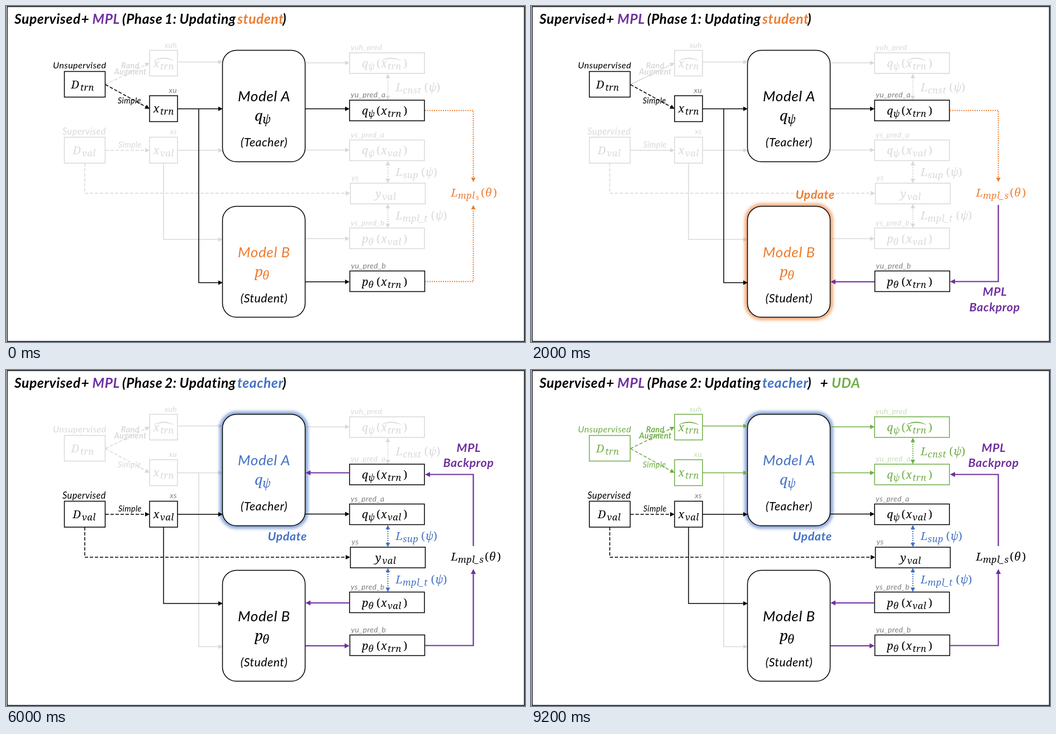
An HTML page that plays this animation: 929x603 px, repeating every 10 s.

```html
<!DOCTYPE html>
<html lang="en">
<head>
<meta charset="utf-8">
<title>Teacher and student training phases</title>
<style>
  html, body { margin: 0; width: 100%; height: 100%; overflow: hidden; background: #fff; }
  svg { display: block; width: 929px; height: 603px; }
  text { font-family: Lato, sans-serif; font-style: italic; letter-spacing: .025em; white-space: pre; }
  .math { font-family: "Noto Serif", "Liberation Serif", serif; }
  .up { font-style: normal; }
  .bold { font-weight: 700; }
</style>
</head>
<body>
<svg id="stage" viewBox="0 0 929 603" xmlns="http://www.w3.org/2000/svg"></svg>
<script>
const STEP_MS = 2000, STEPS = 5;
const INK = {
  k: '#000', g: '#d9d9d9', d: '#7f7f7f', o: '#ed7d31',
  b: '#4472c4', n: '#70ad47', l: '#c5e0b4', p: '#7030a0'
};

// One ink letter per step; '-' hides the part.
const UNSUP = 'kkggn', SUP = 'ggkkk', AUG = 'ggggn';
const UNSUP_TAG = 'ddggl', SUP_TAG = 'ggddd', AUG_TAG = 'ggggl';

const parts = [];
const add = (inks, draw) => parts.push({ inks, draw });

function textSvg(x, y, size, str, ink, { cls = '', anchor = 'start' } = {}) {
  return `<text x="${x}" y="${y}" font-size="${size}" fill="${ink}" class="${cls}" text-anchor="${anchor}">${str}</text>`;
}
const label = (inks, x, y, size, str, opt) =>
  add(inks, ink => textSvg(x, y, size, str, ink, opt));
const tag = (inks, x, y, str, anchor) => label(inks, x, y, 13.9, str, { anchor });

function box(inks, x, y, w, h) {
  add(inks, ink => `<rect x="${x}" y="${y}" width="${w}" height="${h}" fill="none" stroke="${ink}" stroke-width="1.5"/>`);
}

// Runs are [x, text, kind]: 's' subscript, 't' nested subscript, 'r' upright.
function math(inks, y, runs, size = 20) {
  add(inks, ink => runs.map(([x, str, kind]) => {
    const scale = kind === 's' ? .82 : kind === 't' ? .62 : 1;
    const drop = kind === 's' ? .2 : kind === 't' ? .32 : 0;
    return textSvg(x, y + size * drop, size * scale, str, ink, { cls: kind === 'r' ? 'math up' : 'math' });
  }).join(''));
}
const call = (inks, y, fn, sub, arg) => math(inks, y, [
  [637, fn], [648.5, sub, 's'], [663, '(', 'r'],
  [671, 'x'], [683, arg, 's'], [711.5, ')', 'r']
]);
const loss = (inks, y, x, sub, open, arg, extra = []) => math(inks, y, [
  [x, 'L'], [x + 12.5, sub, 's'], ...extra,
  [open, '(', 'r'], [open + 8, arg], [open + 22, ')', 'r']
]);
const hat = (inks, x, y) => add(inks, ink =>
  `<path d="M${x} ${y}q17.5-10 35 0q-17.5-7-35 0z" fill="${ink}" stroke="${ink}" stroke-width=".3"/>`);

// Polyline with a solid head at its end, and at its start when both is set.
function arrowSvg(points, ink, { width = 1.5, dash = '', both = false } = {}) {
  const len = width > 2 ? 9 : 8, half = width > 2 ? 4.5 : 4;
  const pts = points.map(p => [...p]);
  let heads = '';
  const head = (tip, from) => {
    const [tx, ty] = tip;
    const d = Math.hypot(tx - from[0], ty - from[1]);
    const ux = (tx - from[0]) / d, uy = (ty - from[1]) / d;
    const bx = tx - ux * len, by = ty - uy * len;
    heads += `<path d="M${tx} ${ty}L${bx - uy * half} ${by + ux * half}L${bx + uy * half} ${by - ux * half}z" fill="${ink}"/>`;
    tip[0] = bx + ux;
    tip[1] = by + uy;
  };
  head(pts[pts.length - 1], pts[pts.length - 2]);
  if (both) head(pts[0], pts[1]);
  return `<polyline points="${pts.join(' ')}" fill="none" stroke="${ink}" stroke-width="${width}" stroke-dasharray="${dash}"/>${heads}`;
}
const arrow = (inks, points, opt) => add(inks, (ink, step) =>
  arrowSvg(points, ink, typeof opt === 'function' ? opt(step) : opt));
const flat = (inks, x1, x2, y, opt) => arrow(inks, [[x1, y], [x2, y]], opt);

const DASH = { dash: '6 3' }, DOTS = { width: 2, dash: '2 2' };
const THICK = { width: 2.2 }, PAIR = { width: 2, dash: '2 2', both: true };
const dashUnlessUpdate = step => step === 1 ? {} : DASH;

// Models
function model(y, h, glowInks, nameInks, name, fn, sub, role) {
  const rect = `x="387.5" y="${y}" width="148" height="${h}" rx="25"`;
  add(glowInks, ink => `<rect ${rect} fill="none" stroke="${ink}" stroke-width="11" opacity=".6" filter="url(#soft)"/>`);
  add('kkkkk', ink => `<rect ${rect} fill="#fff" stroke="${ink}" stroke-width="1.5"/>`);
  label(nameInks, 462, y + 91.5, 26, name, { anchor: 'middle' });
  math(nameInks, y + 126.5, [[445, fn], [459, sub, 's']], 26);
  label('kkkkk', 462, y + 172, 21.2, role, { anchor: 'middle' });
}
model(79.5, 200, '---bb', 'kkbbb', 'Model A', 'q', 'ψ', '(Teacher)');
model(359.5, 199, '-o---', 'ookkk', 'Model B', 'p', 'θ', '(Student)');

// Title
const title = (inks, x, str) => label(inks, x, 32, 24.5, str, { cls: 'bold' });
title('kkkkk', 15, 'Supervised');
title('kkkkk', 134.5, '+');
title('ppppp', 154.5, 'MPL');
title('kkkkk', 208, '(Phase');
title('kk---', 284, '1:');
title('--kkk', 284, '2:');
title('kkkkk', 310.5, 'Updating');
title('oo---', 414, 'student');
title('--bbb', 414, 'teacher');
title('kkkkk', 495, ')');
title('----k', 517.5, '+');
title('----n', 538, 'UDA');

// Supervised inputs
box(SUP, 104.5, 235.5, 73, 46.5);
math(SUP, 266, [[119.5, 'D'], [136, 'val', 's']]);
label(SUP, 101, 231, 16.4, 'Supervised');
box(SUP, 257, 235.5, 50, 46.5);
math(SUP, 266, [[263.5, 'x'], [276, 'val', 's']]);
tag(SUP_TAG, 306, 230, 'xs', 'end');
flat(SUP, 178, 257, 259, dashUnlessUpdate);
label(SUP, 201, 254, 14.4, 'Simple');
flat(SUP, 307, 388, 259);
arrow(SUP, [[282, 282], [282, 419], [388, 419]]);
arrow(SUP, [[141, 282], [141, 336], [616, 336]], DASH);

// Unsupervised inputs
box(UNSUP, 104.5, 117.5, 73, 46);
math(UNSUP, 148, [[116.5, 'D'], [133, 'trn', 's']]);
label(UNSUP, 84, 112, 16.2, 'Unsupervised');
box(AUG, 257, 79.5, 50, 46);
math(AUG, 110, [[263.5, 'x'], [276, 'trn', 's']]);
hat(AUG, 265, 98);
tag(AUG_TAG, 306, 75, 'xuh', 'end');
box(UNSUP, 257, 161, 50, 46.5);
math(UNSUP, 191, [[263.5, 'x'], [276, 'trn', 's']]);
tag(UNSUP_TAG, 306, 156, 'xu', 'end');
arrow(AUG, [[178, 141], [257, 102]], dashUnlessUpdate);
arrow(UNSUP, [[178, 141], [257, 184.5]], DASH);
label(AUG, 206, 112, 14.4, 'Rand', { cls: 'bold' });
label(AUG, 193.5, 123, 14.4, 'Augment', { cls: 'bold' });
label(UNSUP, 200, 175, 14.4, 'Simple');
arrow('kkggg', [[345, 184.5], [345, 496.5], [388, 496.5]]);
flat(AUG, 307, 388, 100.5);
flat(UNSUP, 307, 388, 184.5);

// Outputs
function output(inks, tagInks, x, y, name) {
  box(inks, x, y, 134, 37);
  tag(tagInks, x + 2, y - 5, name);
}
output(AUG, AUG_TAG, 615, 84, 'yuh_pred');
output('kkkkn', UNSUP_TAG, 615, 169, 'yu_pred_a');
output(SUP, SUP_TAG, 615, 240.5, 'ys_pred_a');
output(SUP, SUP_TAG, 616.5, 318, 'ys');
output(SUP, SUP_TAG, 615, 398.5, 'ys_pred_b');
output('kkkkk', 'ddddd', 615.5, 475.5, 'yu_pred_b');
call(AUG, 110, 'q', 'ψ', 'trn');
hat(AUG, 672, 98);
call('kkkkn', 195, 'q', 'ψ', 'trn');
call(SUP, 266, 'q', 'ψ', 'val');
math(SUP, 344, [[661, 'y'], [673.5, 'val', 's']]);
call(SUP, 425, 'p', 'θ', 'val');
call('kkkkk', 502, 'p', 'θ', 'trn');

// Links between models and outputs
flat(AUG, 536, 615, 102);
flat('kkk-n', 536, 615, 184.5);
flat('---p-', 615, 536, 184.5, THICK);
flat(SUP, 536, 615, 258.5);
flat('ggk--', 536, 615, 417.5);
flat('---pp', 615, 536, 418, THICK);
flat('k----', 536, 615, 495);
flat('---pp', 536, 615, 495, THICK);
flat('-p---', 615, 536, 495, THICK);
flat('--k--', 615, 536, 495);

// Losses
arrow(AUG, [[683.5, 121.5], [683.5, 169]], PAIR);
arrow('ggbbb', [[683.5, 278], [683.5, 318]], PAIR);
arrow('ggbbb', [[683.5, 355], [683.5, 398.5]], PAIR);
loss(AUG, 153, 697.5, 'cnst', 748.5, 'ψ');
loss('ggbbb', 305, 697.5, 'sup', 743, 'ψ');
loss('ggbbb', 383, 697.5, 'mpl_t', 760.5, 'ψ');
loss('o----', 342, 796.5, 'mpl', 850, 'θ', [[841, 's', 't']]);
loss('-okkk', 342, 796.5, 'mpl_s', 857, 'θ');

// Outer loop on the right
const upper = [[750, 187.5], [836.5, 187.5], [836.5, 316]];
const lower = [[750, 494.5], [836.5, 494.5], [836.5, 357]];
const reversed = path => [...path].reverse();
arrow('oo---', upper, DOTS);
arrow('--k--', upper);
arrow('---pp', reversed(upper), THICK);
arrow('o----', lower, DOTS);
arrow('-p---', reversed(lower), THICK);
arrow('--k--', reversed(lower));
arrow('---pp', lower, THICK);

// Update notes
const note = (inks, x, y, str) => label(inks, x, y, 21.5, str, { cls: 'bold' });
note('-o---', 473.5, 346, 'Update');
note('---bb', 468.5, 306, 'Update');
note('-p---', 808.5, 520, 'MPL');
note('-p---', 784.5, 548, 'Backprop');
note('---pp', 806.5, 147, 'MPL');
note('---pp', 782.5, 174, 'Backprop');

// Faded parts lie beneath the active ones.
function scene(step) {
  const shown = parts.filter(p => p.inks[step] !== '-');
  const faded = p => p.inks[step] === 'g';
  return [...shown.filter(faded), ...shown.filter(p => !faded(p))]
    .map(p => p.draw(INK[p.inks[step]], step)).join('');
}

const stage = document.getElementById('stage');
stage.innerHTML = `
  <defs><filter id="soft" x="-20%" y="-20%" width="140%" height="140%"><feGaussianBlur stdDeviation="2.8"/></filter></defs>
  <rect x="2" y="1" width="926" height="601" fill="#fff" stroke="#000" stroke-width="1.5"/>` +
  Array.from({ length: STEPS }, (_, i) => `<g class="step" visibility="hidden">${scene(i)}</g>`).join('');

const scenes = [...stage.querySelectorAll('.step')];
const start = performance.now();
let current = -1;
function tick() {
  const step = Math.floor((performance.now() - start) / STEP_MS) % STEPS;
  if (step !== current) {
    scenes.forEach((g, i) => g.setAttribute('visibility', i === step ? 'visible' : 'hidden'));
    current = step;
  }
  requestAnimationFrame(tick);
}
tick();
</script>
</body>
</html>
```
